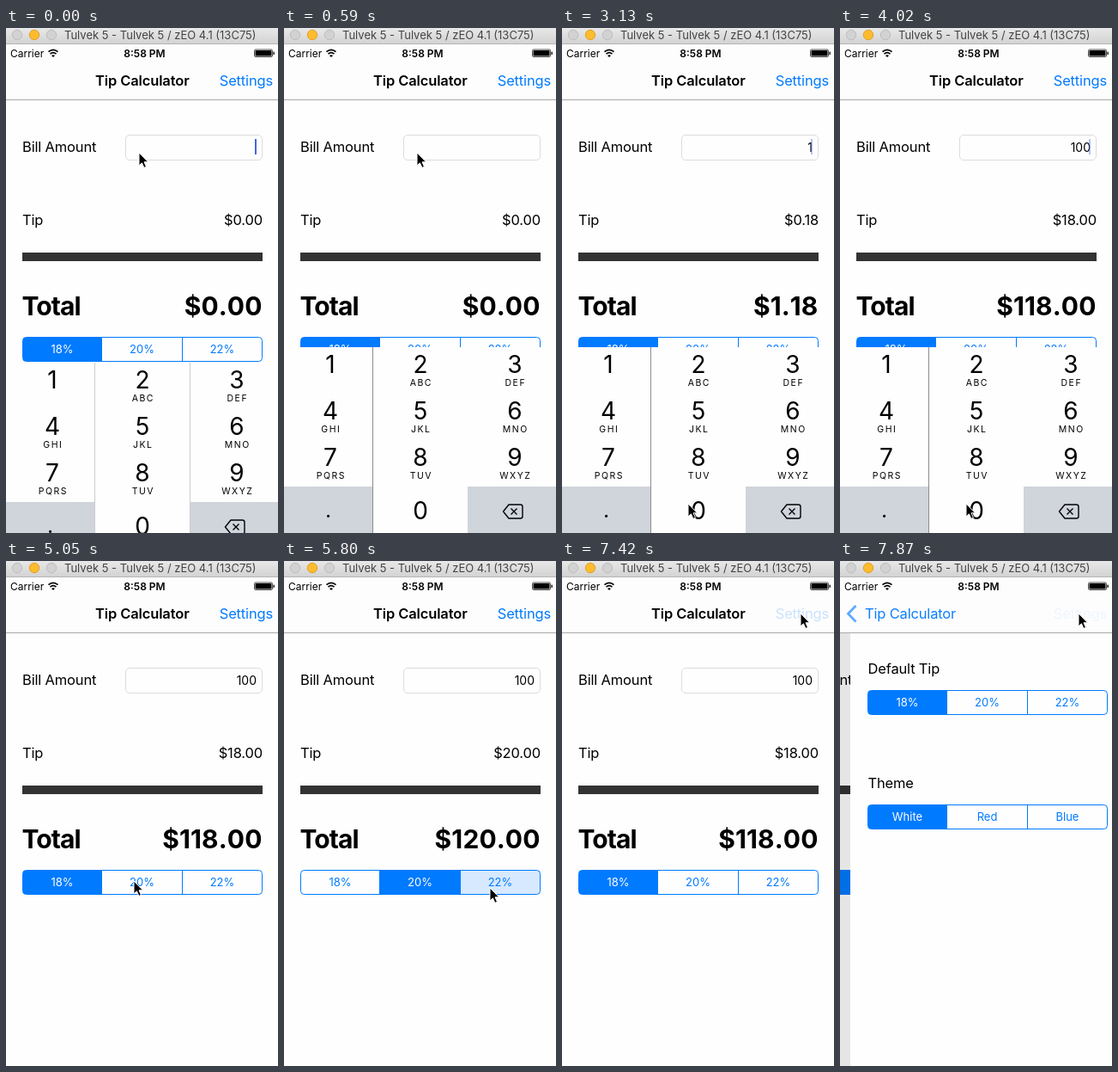
Animation, 317 px wide and 587 px high, one loop 8 s. Source, as an HTML page:

```html
<!DOCTYPE html>
<html lang="en">
<head>
<meta charset="utf-8">
<title>Tip Calculator</title>
<style>
  html, body { margin: 0; width: 100%; height: 100%; overflow: hidden; background: #fefefe; }
  svg { display: block; width: 317px; height: 587px; font-family: Inter, Roboto, "Liberation Sans", sans-serif; }
  #total { font-kerning: none; }
</style>
</head>
<body>
<svg id="stage" viewBox="0 0 317 587" xmlns="http://www.w3.org/2000/svg"></svg>
<script>
const LOOP = 8000, TICK = 148.5, BLUE = '#007aff', KEY_GRAY = '#d0d4db';
const KEYBOARD_HEIGHT = 216, DISMISS = 30.3, PUSH = 51.08;

const text = (x, y, str, size = 16.5, attrs = '') =>
  `<text x="${x}" y="${y}" font-size="${size}" ${attrs}>${str}</text>`;
const rect = (x, y, w, h, attrs) =>
  `<rect x="${x}" y="${y}" width="${w}" height="${h}" ${attrs}/>`;
const body = 'letter-spacing="-.165"';
const right = body + ' text-anchor="end"';

// Segmented control; each part has a fill and a centred label.
function segments(x, y, labels, name) {
  const edges = [0, 92, 186, 279];
  const clip = `clip-${name}`;
  const parts = labels.map((label, i) => {
    const left = x + edges[i], width = edges[i + 1] - edges[i];
    return rect(left, y, width, 28, `id="${name}${i}" fill="${i ? '#fefefe' : BLUE}"`) +
      text(left + width / 2, y + 18.8, label, 13,
        `id="${name}Label${i}" text-anchor="middle" fill="${i ? BLUE : '#fff'}"`);
  }).join('');
  return `<clipPath id="${clip}">${rect(x, y, 279, 28, 'rx="4"')}</clipPath>
    <g clip-path="url(#${clip})">${parts}</g>
    <path d="M${x + edges[1]} ${y}v28M${x + edges[2]} ${y}v28" stroke="${BLUE}"/>
    ${rect(x, y, 279, 28, `rx="4" fill="none" stroke="${BLUE}"`)}`;
}

function keypad() {
  const centers = [54, 159, 269];
  const letters = ['', 'ABC', 'DEF', 'GHI', 'JKL', 'MNO', 'PQRS', 'TUV', 'WXYZ'];
  const keys = letters.map((word, i) => {
    const x = centers[i % 3], y = 371 + 54 * Math.floor(i / 3);
    return text(x, y + 30, i + 1, 28, 'text-anchor="middle"') +
      text(x + .8, y + 45, word, 10.5, 'text-anchor="middle" letter-spacing="1.5"');
  }).join('');
  return rect(0, 371, 317, 216, 'fill="#fefefe"') +
    rect(0, 533, 104, 54, `fill="${KEY_GRAY}"`) +
    rect(214, 533, 103, 54, `fill="${KEY_GRAY}"`) +
    rect(0, 371, 103, 54, `id="key1" fill="${KEY_GRAY}"`) +
    rect(104, 533, 110, 54, `id="key0" fill="${KEY_GRAY}"`) +
    '<path id="lineLeft" d="M103.5 371v216"/><path id="lineRight" d="M214.5 371v216" stroke="#cdcdd0"/>' +
    keys + text(159, 571, '0', 28, 'text-anchor="middle"') +
    text(51.5, 569, '.', 25, 'text-anchor="middle"') +
    `<path d="M262 554h13.500q2.500 0 2.500 2.500v11q0 2.500-2.500 2.500h-13.500l-6.500-8z
      M264.500 558.500l7 7m0-7l-7 7" fill="none" stroke="#000" stroke-width="1.400" stroke-linejoin="round"/>`;
}

const light = (x, color, edge) => `<circle cx="${x}" cy="8" r="5.700" fill="${color}" stroke="${edge}"/>`;

const $ = id => document.getElementById(id);
$('stage').innerHTML = `
  <defs><linearGradient id="chrome" x2="0" y2="1">
    <stop stop-color="#e8e8e8"/><stop offset="1" stop-color="#d3d3d3"/>
  </linearGradient></defs>
  ${rect(0, 0, 317, 587, 'fill="#fefefe"')}
  <g id="home">
    ${text(19, 144, 'Bill Amount', 16.5, body)}
    ${rect(139.5, 124.5, 159, 29, 'rx="4.500" fill="#fefefe" stroke="#dcdcdc"')}
    ${text(292, 144, '', 14, 'id="bill" text-anchor="end"')}
    ${rect(290, 129, 2, 18, 'id="caret" fill="#4467e2"')}
    ${text(19, 229, 'Tip', 16.5, body)}
    ${text(299, 229, '', 16.5, 'id="tip" ' + right)}
    ${rect(19, 261, 280, 10, 'fill="#333"')}
    ${text(18.5, 334, 'Total', 30, 'font-weight="650" letter-spacing="-.900"')}
    ${text(298.5, 334, '', 30, 'id="total" font-weight="650" letter-spacing=".100" text-anchor="end"')}
    ${segments(19.5, 359.5, ['18%', '20%', '22%'], 'rate')}
    <g id="keyboard">${keypad()}</g>
  </g>
  ${rect(0, 84, 317, 503, 'id="shade"')}
  <g id="settings">
    ${rect(0, 84, 317, 503, 'fill="#fefefe"')}
    ${text(20.5, 130.5, 'Default Tip', 16.5, body)}
    ${segments(20.5, 150.5, ['18%', '20%', '22%'], 'preset')}
    ${text(20.5, 263.5, 'Theme', 16.5, body)}
    ${segments(20.5, 283.5, ['White', 'Red', 'Blue'], 'theme')}
  </g>
  ${rect(0, 18, 317, 65, 'fill="#fdfdfd"')}
  ${rect(0, 83, 317, 1, 'fill="#a9a9a9"')}
  ${text(104, 67, 'Tip Calculator', 16.5, 'id="title" font-weight="600" letter-spacing="-.130"')}
  <path id="chevron" d="M18.500 52l-9 9.300 9 9.300" fill="none" stroke="${BLUE}" stroke-width="2.800"/>
  ${text(26, 67, 'Tip Calculator', 16.5, `id="backLabel" fill="${BLUE}" ` + body)}
  ${text(311, 67, 'Settings', 16.5, `id="settingsLink" fill="${BLUE}" ` + right)}
  ${text(5, 33.5, 'Carrier', 12)}
  <g fill="none" stroke="#000" stroke-width="1.700">
    <path d="M49.500 27.700q5.500-4.800 11 0M51.500 30.200q3.500-3 7 0"/>
    <path d="M55 34l-2-2q2-1.600 4 0z" fill="#000" stroke="none"/>
  </g>
  ${text(161.5, 33.5, '8:58 PM', 12, 'font-weight="600" text-anchor="middle"')}
  ${rect(289.5, 25, 21, 8.5, 'rx="1.500" fill="none" stroke="#000" stroke-width=".700"')}
  ${rect(290.5, 26, 19, 6.5, 'rx=".800"')}
  ${rect(311.5, 27.5, 1.3, 3.5, 'rx=".600"')}
  ${rect(0, 0, 317, 18, 'fill="url(#chrome)"')}
  ${rect(0, 18, 317, 1, 'fill="#b5b5b5"')}
  ${light(13, '#d2d2d2', '#bdbdbd')}${light(33, '#fdbc2e', '#e0a12a')}${light(53, '#d2d2d2', '#bdbdbd')}
  ${text(68, 12.8, 'Tulvek 5 - Tulvek 5 / zEO 4.1 (13C75)', 13, 'fill="#444"')}
  <path id="cursor" d="M0 0v15l3.400-3.200 2.500 5.600 2.600-1.200-2.500-5.400h4.600z"
    fill="#000" stroke="#fff" stroke-width="1" stroke-linejoin="round"/>`;

// Pointer stops: tick, x, y
const pointer = [
  [12, 155, 145], [13, 140, 190], [15, 62, 370], [16, 56, 388], [17, 56, 388],
  [19, 118, 490], [20, 142, 540], [21, 147, 553], [27, 147, 553], [28, 150, 500],
  [30, 152, 292], [31, 152, 290], [34, 149, 372], [36, 149, 372], [38, 215, 378],
  [39, 240, 380], [40, 240, 380], [42, 120, 380], [43, 70, 370], [45, 66, 370],
  [48, 255, 110], [49, 276, 66], [50, 278, 61]
];

function pointerAt(tick) {
  const next = pointer.findIndex(stop => stop[0] > tick);
  if (next === 0) return pointer[0].slice(1);
  if (next < 0) return pointer[pointer.length - 1].slice(1);
  const [t0, x0, y0] = pointer[next - 1], [t1, x1, y1] = pointer[next];
  const f = (tick - t0) / (t1 - t0);
  return [x0 + (x1 - x0) * f, y0 + (y1 - y0) * f];
}

// Critically damped settling from 1 to 0
function settle(ticks) {
  const u = 2.65 * Math.max(0, ticks);
  return (1 + u) * Math.exp(-u);
}

// Blinks about once a second; typing restarts the cycle.
function caretOpacity(tick) {
  if (tick > DISMISS) return 0;
  const since = tick < 17 ? tick : Math.max(0, tick - 18);
  const phase = since * TICK / 1000 % 1;
  return phase < .32 ? 1 : phase < .47 ? .4 : phase < .78 ? 0 : phase < .85 ? .12 : 1;
}

const set = (id, attrs) => {
  for (const name in attrs) $(id).setAttribute(name, attrs[name]);
};
const shift = (x, y) => ({ transform: `translate(${Math.round(x)} ${Math.round(y)})` });
const money = value => '$' + value.toFixed(2);

function draw(ms) {
  // The screen refreshes in steps; the margin absorbs rounding of step times.
  const tick = Math.floor((ms + 10) / TICK);

  const bill = tick < 17 ? '' : tick < 23 ? '1' : tick < 26 ? '10' : '100';
  const selected = tick < 36 ? 0 : tick < 40 ? 1 : tick < 45 ? 2 : 0;
  const pressed = { 35: 1, 39: 2, 44: 0 }[tick];
  const tip = bill * [.18, .2, .22][selected];
  $('bill').textContent = bill;
  $('tip').textContent = money(tip);
  $('total').textContent = money(+bill + tip);
  set('caret', { opacity: caretOpacity(tick) });
  for (let i = 0; i < 3; i++) {
    const on = i === selected;
    set('rate' + i, { fill: on ? BLUE : i === pressed ? '#d6e9ff' : '#fefefe' });
    set('rateLabel' + i, { fill: on ? '#fff' : BLUE });
  }

  const slide = tick < DISMISS ? settle(tick + 1.55) : 1 - settle(tick - DISMISS);
  const moving = slide > .02;
  set('keyboard', { ...shift(0, KEYBOARD_HEIGHT * slide), visibility: tick < 34 ? 'visible' : 'hidden' });
  set('lineLeft', { stroke: moving ? '#cdcdd0' : '#8c8c8f' });
  set('lineRight', { opacity: moving ? 1 : 0 });
  set('key1', { opacity: tick === 16 ? 1 : 0 });
  set('key0', { opacity: tick === 22 || tick === 25 ? 1 : 0 });

  const rest = settle(tick - PUSH), done = 1 - rest;
  set('home', shift(-95 * done, 0));
  set('shade', { opacity: .1 * done });
  set('settings', shift(317 * rest, 0));
  set('title', { x: 104 - 78 * done, opacity: rest > .1 ? rest : 0 });
  set('chevron', { opacity: done ** 12 });
  set('backLabel', { x: 26 + 78 * rest, opacity: done });
  set('settingsLink', { opacity: tick < 50 ? 1 : .05 + .15 * rest });

  set('cursor', shift(...pointerAt(tick)));
}

const start = performance.now();
function loop() {
  draw((performance.now() - start) % LOOP);
  requestAnimationFrame(loop);
}
draw(0);
requestAnimationFrame(loop);
</script>
</body>
</html>
```
